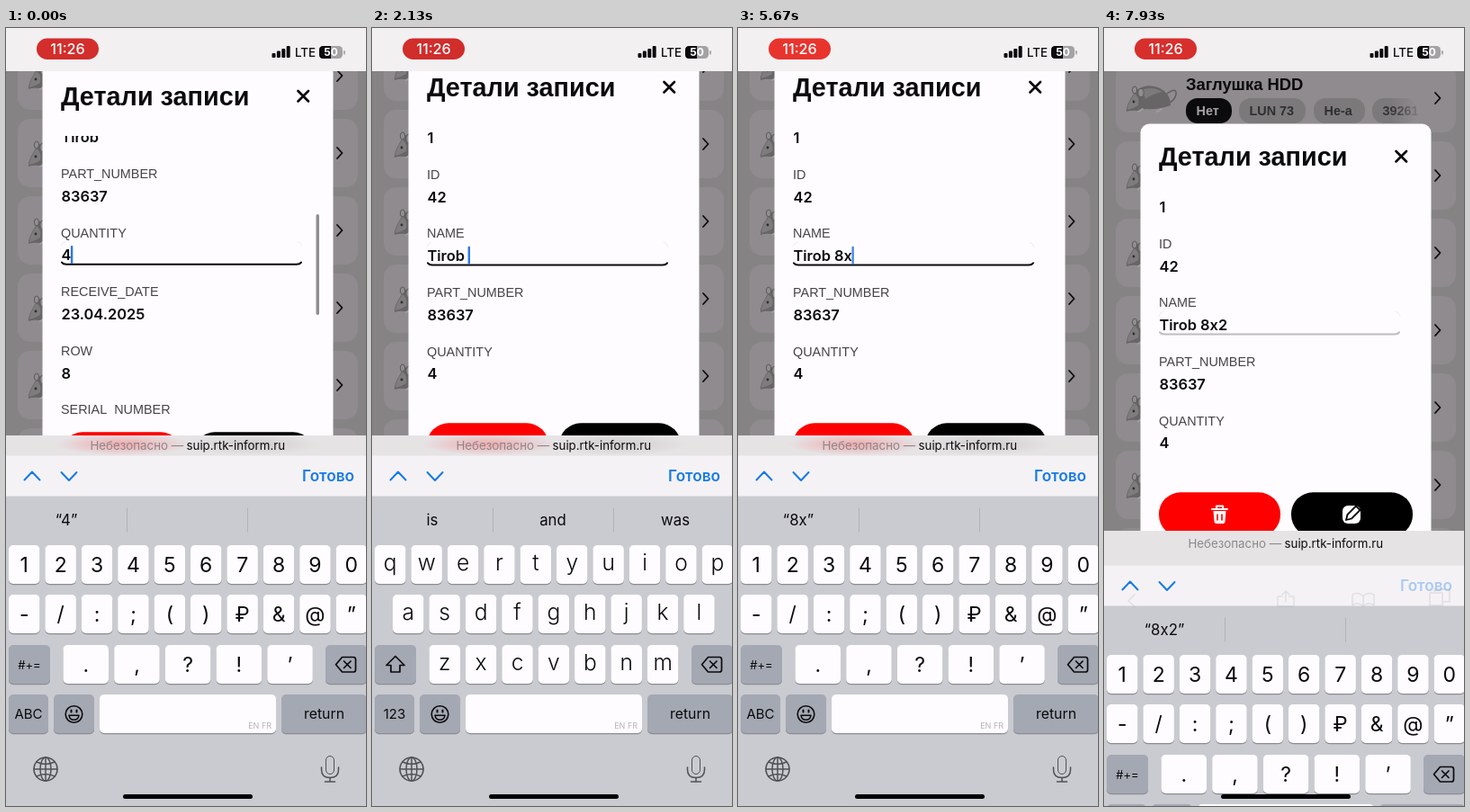
Write an HTML page that moves like this. It is 400 px wide and 865 px high and loops after 8 s.

```html
<!DOCTYPE html>
<html lang="ru">
<head>
<meta charset="utf-8">
<title>Детали записи</title>
<style>
html, body { margin: 0; width: 100%; height: 100%; overflow: hidden; background: #868385; }
svg { display: block; width: 400px; height: 865px; font-family: Inter, "Noto Sans", sans-serif; }
.arial { font-family: "Liberation Sans", Arial, sans-serif; }
.mid { text-anchor: middle; }
.end { text-anchor: end; }
.line { fill: none; stroke-linecap: round; stroke-linejoin: round; }
</style>
</head>
<body>
<svg id="stage" viewBox="0 0 400 865">
  <defs>
    <clipPath id="fields"><rect x="41" y="44" width="322" height="309"/></clipPath>
    <radialGradient id="redGlow"><stop stop-color="#ff4d50" stop-opacity=".4"/><stop offset="1" stop-color="#ff4d50" stop-opacity="0"/></radialGradient>
    <radialGradient id="darkGlow"><stop stop-color="#555" stop-opacity=".16"/><stop offset="1" stop-color="#555" stop-opacity="0"/></radialGradient>
    <linearGradient id="chipFade"><stop offset=".4" stop-color="#7c797b"/><stop offset="1" stop-color="#7c797b" stop-opacity="0"/></linearGradient>
    <linearGradient id="inkFade"><stop offset=".2" stop-color="#343234"/><stop offset="1" stop-color="#343234" stop-opacity=".15"/></linearGradient>
    <g id="mouse">
      <path class="line" d="M70 -5Q81 -13 80 -4Q78 4 70 6" stroke="#625f61" stroke-width="1.5"/>
      <path d="M35 -8Q46 -17 60 -12Q74 -6 74 8Q62 13 46 12L38 14Q30 13 25 15Q24 8 35 -8Z" fill="#686567"/>
      <path d="M42 -9Q53 -14 65 -7Q54 -5 46 1Z" fill="#7d7a7c"/>
      <path d="M34 -5Q40 0 38 8Q32 12 26 13Q26 6 34 -5Z" fill="#7f7c7e"/>
      <ellipse cx="34" cy="-9" rx="2.6" ry="4" fill="#918d90" stroke="#5c595b"/>
      <ellipse cx="41" cy="-6" rx="3.2" ry="4.5" fill="#918d90" stroke="#5c595b"/>
      <circle cx="33" cy="4" r="1.4" fill="#302e30"/>
      <path class="line" d="M43 12l-5 3M64 12l-5 3" stroke="#a19da0" stroke-width="2"/>
    </g>
  </defs>
</svg>
<script>
const LOOP = 8000, INK = '#0b0a0c', PAPER = '#fefcfe', BLUE = '#167be6';
const PITCH = 65.6, NAME = 'Tirob';
const stage = document.getElementById('stage');

function add(parent, tag, attrs = {}, text) {
  const node = document.createElementNS('http://www.w3.org/2000/svg', tag);
  for (const key in attrs) node.setAttribute(key, attrs[key]);
  if (text !== undefined) node.textContent = text;
  return parent.appendChild(node);
}
const group = (parent, attrs) => add(parent, 'g', attrs);
const box = (parent, x, y, width, height, rx, fill) => add(parent, 'rect', { x, y, width, height, rx, fill });
const label = (parent, x, y, size, text, attrs) =>
  add(parent, 'text', { x, y, 'font-size': size, fill: INK, ...attrs }, text);
const line = (parent, d, stroke, width, attrs) =>
  add(parent, 'path', { d, stroke, 'stroke-width': width, class: 'line', ...attrs });

// Dimmed list behind the dialog
box(stage, 0, 0, 400, 865, 0, '#868385');
const list = group(stage);
for (let k = 0; k < 8; k++) {
  const row = group(list, { transform: `translate(0 ${-43 + 86 * k})` });
  box(row, 13, -38, 378, 76, 14, '#8f8b8e');
  add(row, 'use', { href: '#mouse' });
  line(row, 'M368 -6l5.5 6l-5.5 6', INK, 1.8);
  if (k === 0) {
    const bold = { 'font-weight': 700, class: 'arial' };
    label(row, 91, -9, 18.4, 'Заглушка HDD', bold);
    const chip = (x, w, text, fill, ink) => {
      box(row, x, 0, w, 28, 13, fill);
      label(row, x + 11.5, 19, 14.4, text, { ...bold, fill: ink });
    };
    chip(91, 51, 'Нет', INK, '#a5a2a4');
    chip(150, 74, 'LUN 73', '#7c797b', '#302e30');
    chip(233, 57, 'Не-а', '#7c797b', '#302e30');
    chip(298, 50, '39261', 'url(#chipFade)', 'url(#inkFade)');
  }
}

// Dialog, measured from the middle of its heading
const dialog = group(stage);
box(dialog, 40.5, -36.5, 323, 560, 10, PAPER);
label(dialog, 61, 9.6, 28.8, 'Детали записи', { 'font-weight': 700, class: 'arial' });
line(dialog, 'M324.5 -6l11.5 11.5m0 -11.5l-11.5 11.5', INK, 2.7);
const content = group(group(dialog, { 'clip-path': 'url(#fields)' }));
const values = [
  ['', '1'], ['ID', '42'], ['NAME', NAME], ['PART_NUMBER', '83637'], ['QUANTITY', '4'],
  ['RECEIVE_DATE', '23.04.2025'], ['ROW', '8'], ['SERIAL_NUMBER', '']
].map(([caption, value], i) => {
  const y = 31 + PITCH * i;
  label(content, 61, y + 5.2, 14.4, caption, { fill: '#464446', class: 'arial' });
  return label(content, 61.5, y + 31, 16.4, value, { 'font-weight': 600 });
});
const focusBox = group(content);
line(focusBox, 'M61 15Q62 11 66 10M324 10Q328 11 329 15', '#efecef', 1);
const underline = line(focusBox, 'M62 33.2Q63.5 35.3 67 35.3H323Q326.5 35.3 328 33.2', INK, 2);
const caret = box(focusBox, 0, 14.5, 2.4, 20, 1, '#2b76ea');
const thumb = box(dialog, 344.5, 0, 3.5, 112, 1.75, '#918e91');

box(dialog, 61, 373.3, 135, 49, 24, '#fe0000');
box(dialog, 208, 373.3, 135, 49, 24, '#000');
line(dialog, 'M120 392H137M125 391V388.5H132V391', '#fff', 2);
add(dialog, 'path', { d: 'M121.5 394H135.5L134.5 406Q134.4 408 132 408H125Q122.6 408 122.5 406Z', fill: '#fff' });
line(dialog, 'M126 398V404M131 398V404', '#fe0000', 1.6);
box(dialog, 265, 388, 20, 20, 6, '#fff');
line(dialog, 'M269 404L270.5 398L280 388.5L284.5 393L275 402.5Z', '#000', 1.8, { style: 'fill:#fff' });

// Address strip
const strip = box(stage, 0, 453, 400, 23, 0, '#e6e3e5');
const glow = group(stage);
add(glow, 'ellipse', { cx: 130, cy: 463, rx: 75, ry: 12, fill: 'url(#redGlow)' });
add(glow, 'ellipse', { cx: 275, cy: 463, rx: 75, ry: 12, fill: 'url(#darkGlow)' });
const address = group(stage);
label(address, 197, 4.7, 13.3, 'Небезопасно —', { class: 'end', fill: '#8b888b' });
label(address, 200.5, 4.7, 13.3, 'suip.rtk-inform.ru');

// Keyboard
const board = group(stage);
box(board, 0, 475.5, 400, 45.5, 0, '#f5f2f5');
box(board, 0, 520.5, 400, 345, 0, '#cacbd1');
line(board, 'M20.5 502.5L29 493.5L37.5 502.5M61.5 494L70 503L78.5 494', BLUE, 2);
const done = label(board, 387, 504.3, 17.2, 'Готово', { class: 'end', fill: BLUE, 'font-weight': 600 });
const browserIcons = group(board, { opacity: 0 });
line(browserIcons, 'M34 508L27 515L34 521M198 510H193V521H211V510H206M202 516V504M198 508L202 504L206 508' +
  'M288 521Q282 515 276 520V508Q283 504 288 510Q293 504 300 508V520Q294 515 288 521V510' +
  'M362 506H376V520H362ZM367 506V502H384V516H376', '#9d9ba2', 1.5);
line(board, 'M134.5 534V560M268.5 534V560', '#b2b3b9', 1);
const hints = [67, 201, 337].map(x => label(board, x, 553, 16.8, '', { class: 'mid' }));

function key(parent, x, y, w, text = '', { dark = false, size = 23, dy = 30, weight = 400 } = {}) {
  box(parent, x, y + 1.2, w, 43, 5, '#8b8d93');
  box(parent, x, y, w, 43, 5, dark ? '#a3a8b3' : PAPER);
  label(parent, x + w / 2, y + dy, size, text, { class: 'mid', 'font-weight': weight });
}
const keyRow = (parent, chars, x, y, pitch, w, style) =>
  [...chars].forEach((c, i) => key(parent, x + pitch * i, y, w, c, style));
const DARK = { dark: true, size: 15, dy: 27.3 };
const LETTER = { size: 24.6, dy: 27.8, weight: 300 };

const numeric = group(board), alpha = group(board);
keyRow(numeric, '1234567890', 3, 575, 40.4, 34.5);
keyRow(numeric, '-/:;()₽&@”', 3, 630, 40.4, 34.5);
keyRow(numeric, '.,?!’', 63.5, 686, 56.7, 50.5);
key(numeric, 3, 686, 46, '#+=', { ...DARK, size: 13 });
key(numeric, 3, 741, 44, 'ABC', DARK);
keyRow(alpha, 'qwertyuiop', 3, 575, 40.4, 34.5, LETTER);
keyRow(alpha, 'asdfghjkl', 23, 630, 40.4, 34.5, LETTER);
keyRow(alpha, 'zxcvbnm', 63.5, 686, 40.4, 34.5, LETTER);
key(alpha, 3, 686, 46, '', DARK);
line(alpha, 'M26 698.5L36 708.5H31V716H21V708.5H16Z', INK, 1.7);
key(alpha, 3, 741, 44, '123', DARK);

key(board, 355, 686, 46, '', DARK);
line(board, 'M373.5 699.5H386Q388.5 699.5 388.5 702V713.5Q388.5 716 386 716H373.5L366.5 707.8ZM375.5 704l7.5 7.5m0 -7.5l-7.5 7.5', INK, 1.7);
key(board, 53, 741, 45, '', DARK);
add(board, 'circle', { cx: 75.5, cy: 763, r: 9.3, fill: 'none', stroke: INK, 'stroke-width': 1.6 });
line(board, 'M70 764.3H81Q80 769.3 75.5 769.3Q71 769.3 70 764.3Z', INK, 1.5);
line(board, 'M72.5 758.5V760.5M78.5 758.5V760.5', INK, 2);
key(board, 104, 741, 196);
label(board, 295, 779, 9, 'EN FR', { class: 'end', fill: '#b5b4ba' });
key(board, 306, 741, 95, 'return', { ...DARK, size: 15.8 });

const GRAY = '#505157';
add(board, 'circle', { cx: 44, cy: 824, r: 13, fill: 'none', stroke: GRAY, 'stroke-width': 1.6 });
add(board, 'ellipse', { cx: 44, cy: 824, rx: 6, ry: 13, fill: 'none', stroke: GRAY, 'stroke-width': 1.5 });
line(board, 'M44 811V837M31 824H57M34 816Q44 821 54 816M34 832Q44 827 54 832', GRAY, 1.5);
box(board, 355.5, 809.5, 9, 20, 4.5, 'none').setAttribute('stroke', GRAY);
line(board, 'M350.5 822V824.5Q350.5 833.5 360 833.5Q369.5 833.5 369.5 824.5V822M360 833.5V838M354.5 838H365.5', GRAY, 1.5);

// Status bar and home indicator
box(stage, 0, 0, 400, 48, 0, '#f3f0f2');
const pill = box(stage, 34, 11.5, 69, 23.5, 11.75, '#d00');
label(stage, 68.5, 28.8, 16.2, '11:26', { class: 'mid', fill: '#fff', 'font-weight': 500 });
[5, 7.5, 10, 13].forEach((h, i) => box(stage, 295.5 + 5.4 * i, 33 - h, 4, h, 1, INK));
label(stage, 321, 32, 13.4, 'LTE', { 'font-weight': 500 });
box(stage, 348, 20, 26, 14, 4.5, '#a5a2a5');
add(stage, 'path', { d: 'M361 20H352.5Q348 20 348 24.5V29.5Q348 34 352.5 34H361Z', fill: INK });
box(stage, 375, 25, 1.8, 4.5, 1, '#a5a2a5');
label(stage, 361, 31.4, 12, '50', { class: 'mid', fill: '#fff', 'font-weight': 700 });
box(stage, 130, 852, 144, 5, 2.5, '#000');

// Timeline: [start ms, ...state]
const FOCUS = 670;
const typed = [[0, ''], [1900, '\u00a0'], [3900, '\u00a08'], [5200, '\u00a08x'], [6720, '\u00a08x2']];
const layouts = [[0, true], [735, false], [3000, true], [4600, false], [5450, true]];
const suggestions = [
  [0, '“4”', '', ''], [735, '“4”', 't', 't'], [865, `“${NAME}”`, 'tirobs', 'tir'],
  [1900, 'is', 'and', 'was'], [3900, '“8”', '', ''], [5200, '“8x”', '', ''], [6720, '“8x2”', '', '']
];
const at = (table, t) => table.findLast(step => step[0] <= t);
const clamp = x => Math.max(0, Math.min(1, x));
const mix = (a, b, p) => a + (b - a) * p;
const smooth = (from, to, t) => { const p = clamp((t - from) / (to - from)); return p * p * (3 - 2 * p); };
const move = (node, y) => node.setAttribute('transform', `translate(0 ${y})`);
const set = (node, name, value) => node.setAttribute(name, value);

function render(t) {
  const closing = clamp((t - 7805) / 125);
  const heading = mix(76, 66, smooth(660, 960, t)) + 77 * closing;
  const scroll = 142 * (1 - smooth(70, 600, t));
  const onName = t >= FOCUS;

  move(dialog, heading);
  move(list, closing ? 121 * closing : heading - 66);
  move(content, -scroll);
  set(thumb, 'y', 80 + 51 * scroll / 142);
  set(thumb, 'opacity', 1 - smooth(1000, 1300, t));

  const [editTime, suffix] = at(typed, t);
  values[2].textContent = NAME + suffix;
  move(focusBox, 31 + PITCH * (onName ? 2 : 4));
  set(underline, 'stroke', closing ? '#bfbcbf' : INK);
  set(caret, 'x', 61 + values[onName ? 2 : 4].getComputedTextLength());
  const blink = (t - (onName ? Math.max(FOCUS, editTime) : 0)) % 1000;
  set(caret, 'opacity', closing ? 0 : 1 - smooth(440, 560, blink) + smooth(920, 1000, blink));

  const boardShift = 122 * closing, stripTop = mix(453, 559, closing);
  move(board, boardShift);
  set(strip, 'y', stripTop);
  set(strip, 'height', 476 + boardShift - stripTop);
  set(glow, 'opacity', 1 - closing);
  move(address, mix(464, 573, closing));
  set(done, 'opacity', 1 - 0.67 * closing);
  set(browserIcons, 'opacity', 0.22 * closing);

  const isNumeric = at(layouts, t)[1];
  set(numeric, 'visibility', isNumeric ? 'visible' : 'hidden');
  set(alpha, 'visibility', isNumeric ? 'hidden' : 'visible');
  const [since, ...words] = at(suggestions, t);
  const swapping = since === 735;
  hints.forEach((hint, i) => {
    hint.textContent = words[i];
    set(hint, 'dx', swapping ? [0, -18, -9][i] : 0);
    set(hint, 'opacity', swapping ? [0.6, 0.3, 0.3][i] : 1);
  });

  const pulse = (1 + Math.cos((t - 7200) * Math.PI / 1000)) / 2;
  set(pill, 'fill', `rgb(${mix(207, 254, pulse)} ${mix(45, 58, pulse)} ${mix(43, 48, pulse)})`);
}

const start = performance.now();
function tick() {
  const t = (performance.now() - start) % LOOP;
  render(Math.floor((t + 5) * 0.015) / 0.015);
  requestAnimationFrame(tick);
}
tick();
</script>
</body>
</html>
```
